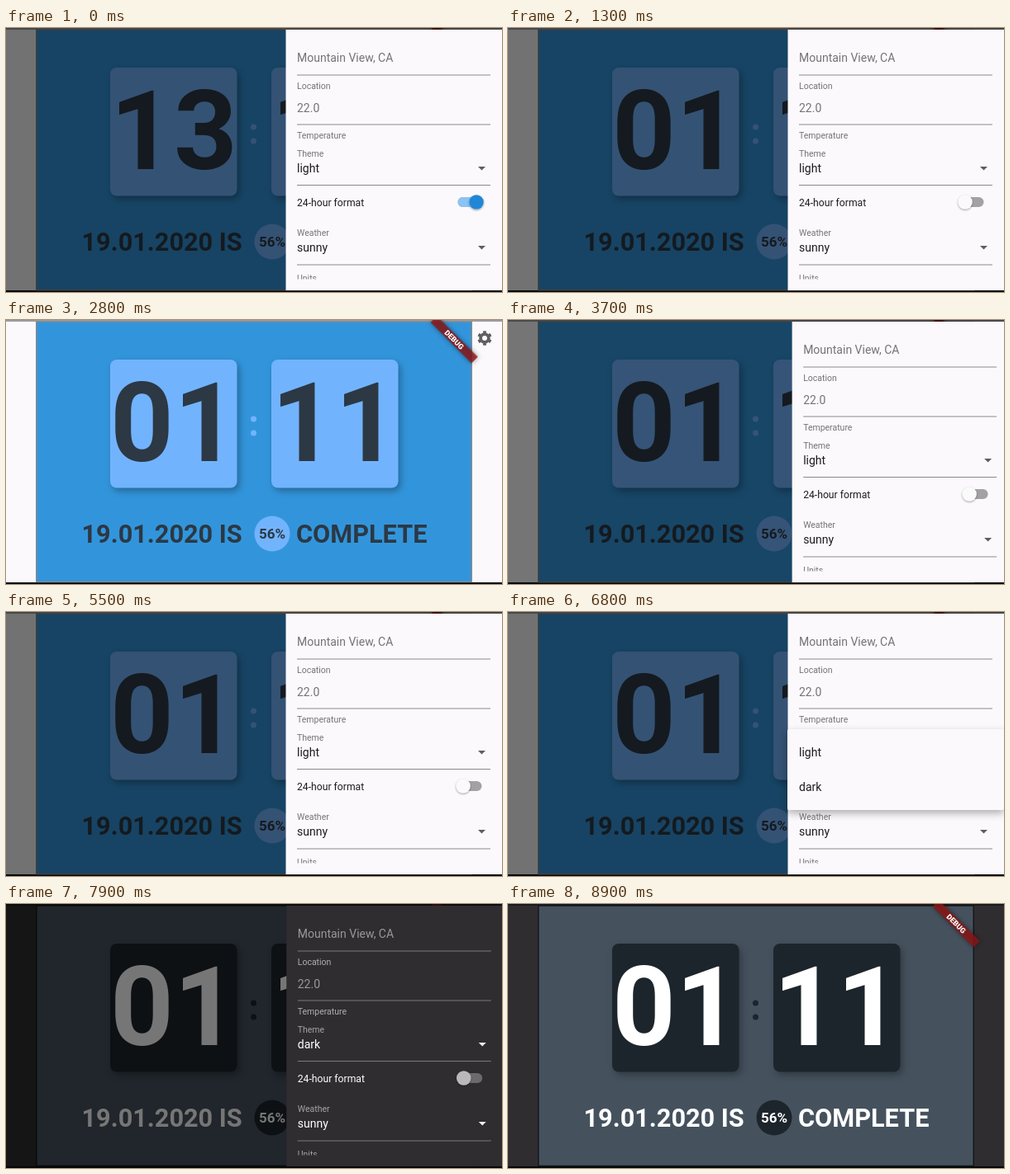
Recreate the animation shown at these times as an HTML page. Size 600x320 px, loop 9.3 s.

```html
<!DOCTYPE html>
<html lang="en">
<head>
<meta charset="utf-8">
<title>Flip clock settings</title>
<style>
html, body { margin: 0; width: 100%; height: 100%; overflow: hidden; background: #050506; }
svg { display: block; width: 600px; height: 320px; font-family: Roboto, sans-serif; }

.light {
  --page: #fbf9fc; --strip: #9d9b9d; --edge: #858b92;
  --clock: #3295db; --card: #72b3fd; --ink: #2c3844;
  --hint: #757375; --caption: #757375; --label: #757375; --value: #1e1c1e; --row: #1e1c1e;
  --rule: #8b898b; --arrow: #5f5d5f; --thumb: #fafafa; --track: #a3a1a3;
}
.turning, .dark {
  --strip: #1c1a1c; --edge: #12161b;
  --clock: #45525e; --card: #1d252c; --ink: #fff;
  --value: #fff; --arrow: #eee; --thumb: #bab8ba;
}
.turning {
  --page: #534f52; --hint: #9b999b; --caption: #a5a3a5; --label: #343234; --row: #0c0b0c;
  --rule: #2d2b2d; --track: #7d7b7d;
}
.dark {
  --page: #302d30; --hint: #9a989a; --caption: #b0aeb0; --label: #a5a3a5; --row: #fff;
  --rule: #7c7a7c; --track: #6c6a6c;
}
.turning .gear, .dark .gear { display: none; }

.page { fill: var(--page); }
.card { fill: var(--card); }
.shadow { filter: drop-shadow(3px 4px 4px rgba(0, 0, 0, .3)); }
.ink { fill: var(--ink); font-weight: 700; }
.digits { font-size: 134px; }
.line { font-size: 30.7px; }
.percent { font-size: 17px; text-anchor: middle; }
.ribbon { filter: drop-shadow(0 0 3px rgba(0, 0, 0, .5)); }
.debug { font-size: 9px; font-weight: 900; fill: #fff; text-anchor: middle; }
.hint { font-size: 14px; fill: var(--hint); }
.caption { font-size: 10.5px; fill: var(--caption); }
.label { font-size: 10.5px; fill: var(--label); }
.value { font-size: 14px; fill: var(--value); }
.row { font-size: 12.2px; fill: var(--row); }
.rule { fill: var(--rule); }
.arrow { fill: var(--arrow); }
#thumb { filter: drop-shadow(0 1px 1px rgba(0, 0, 0, .35)); }
#menuBox { filter: drop-shadow(0 4px 5px rgba(0, 0, 0, .3)); }
</style>
</head>
<body>
<svg id="stage" class="light" viewBox="0 0 600 320">
  <defs>
    <clipPath id="list"><rect x="338" y="2" width="262" height="302.5"/></clipPath>
    <path id="caret" class="arrow" d="M571 168h9l-4.500 4.500z"/>
  </defs>

  <rect class="page" width="600" height="318"/>
  <rect width="600" height="2" fill="var(--strip)"/>
  <rect x="36.750" y="2" width="526.500" height="315.500" fill="var(--clock)" stroke="var(--edge)" stroke-width="1.500"/>

  <g class="card">
    <rect class="shadow" x="126" y="48" width="153.500" height="155.500" rx="8"/>
    <rect class="shadow" x="321" y="48" width="153.500" height="155.500" rx="8"/>
    <circle cx="299.500" cy="120" r="3.500"/>
    <circle cx="299.500" cy="137" r="3.500"/>
    <circle cx="322" cy="259" r="21.500"/>
  </g>
  <g class="ink">
    <text id="hours" class="digits" x="126" y="171">13</text>
    <text class="digits" x="321" y="171">11</text>
    <text class="line" x="91.500" y="270">19.01.2020 IS</text>
    <text class="percent" x="322" y="265">56%</text>
    <text class="line" x="351" y="270">COMPLETE</text>
  </g>

  <g class="gear" transform="translate(579 22) rotate(-90)" fill="none" stroke="#615e61">
    <circle r="4.900" stroke-width="3.800"/>
    <circle r="7.400" stroke-width="2.600" pathLength="6" stroke-dasharray=".5 .5" stroke-dashoffset=".25"/>
  </g>

  <g transform="translate(542.200 23.800) rotate(45)">
    <g class="ribbon">
      <rect x="-35" y="-5.300" width="70" height="10.600" fill="#000" fill-opacity=".5"/>
      <rect x="-35" y="-5.300" width="70" height="10.600" fill="#b71c1c" fill-opacity=".63"/>
    </g>
    <text class="debug" y="3.200">DEBUG</text>
  </g>

  <rect id="scrim" width="600" height="318" fill="#000"/>

  <g id="drawer">
    <rect class="page" x="338.500" y="2" width="262" height="316"/>
    <g clip-path="url(#list)">
      <text class="hint" x="352" y="41">Mountain View, CA</text>
      <text class="caption" x="352" y="73.500">Location</text>
      <text class="hint" x="352" y="101.500">22.0</text>
      <text class="caption" x="352" y="133.500">Temperature</text>
      <text class="label" x="352" y="156">Theme</text>
      <text id="theme" class="value" x="352" y="175">light</text>
      <text class="row" x="352" y="215.500">24-hour format</text>
      <text class="label" x="352" y="251.500">Weather</text>
      <text class="value" x="352" y="271">sunny</text>
      <text class="label" x="352" y="307">Units</text>
      <g class="rule">
        <rect x="352" y="56.500" width="234" height="1"/>
        <rect x="352" y="116.500" width="234" height="1"/>
        <rect x="352" y="190" width="234" height="1"/>
        <rect x="352" y="286.500" width="234" height="1"/>
      </g>
      <use href="#caret"/>
      <use href="#caret" y="96"/>
      <rect x="546.500" y="205" width="29" height="12" rx="6" fill="var(--track)"/>
      <g id="on"><rect x="546.500" y="205" width="29" height="12" rx="6" fill="#8cc3f2"/></g>
      <g id="thumb">
        <circle cx="553" cy="211" r="8.800" fill="var(--thumb)"/>
        <circle id="thumbOn" cx="553" cy="211" r="8.800" fill="#2087d6"/>
      </g>
    </g>
  </g>

  <g id="menu">
    <rect id="menuBox" class="page" x="338" width="262" rx="2"/>
    <text class="value" x="352" y="175">light</text>
    <text id="darkItem" class="value" x="352" y="217">dark</text>
  </g>
</svg>

<script>
const LOOP = 9300, STEP = 100;
const CLOSE_1 = 1815, OPEN = 3440, CLOSE_2 = 7898;
const TOGGLE = 1050, MENU = 5705, PICK = 7100;

const $ = id => document.getElementById(id);
const ramp = (v, from, to) => Math.min(1, Math.max(0, (v - from) / (to - from)));

// Critically damped fling from 1 to 0.
function spring(ms) {
  const t = Math.max(0, ms) / 1000, w = Math.sqrt(500);
  return (1 + (w - 1) * t) * Math.exp(-w * t);
}

function openness(t) {
  if (t < OPEN) return spring(t - CLOSE_1);
  if (t < CLOSE_2) return 1 - spring(t - OPEN);
  return spring(t - CLOSE_2);
}

function drawMenu(t) {
  const p = ramp(t, MENU, MENU + 300);
  const grow = ramp(p, .25, .5);
  const top = 149 - 7 * grow, bottom = 191 + 49 * grow;
  $('menu').style.display = t >= MENU && t < PICK ? '' : 'none';
  $('menu').style.opacity = ramp(p, 0, .25);
  $('menuBox').setAttribute('y', top);
  $('menuBox').setAttribute('height', bottom - top);
  $('darkItem').style.opacity = ramp(p, .786, 1);
}

function draw(t) {
  const open = openness(t);
  const off = ramp(t, TOGGLE, TOGGLE + 200);
  const eased = off * off * (3 - 2 * off);

  $('stage').setAttribute('class', t < PICK ? 'light' : t < PICK + STEP ? 'turning' : 'dark');
  $('hours').textContent = t < TOGGLE ? '13' : '01';
  $('theme').textContent = t < PICK ? 'light' : 'dark';
  $('scrim').style.opacity = .54 * open;
  $('drawer').setAttribute('transform', `translate(${262 * (1 - open)} 0)`);
  $('thumb').setAttribute('transform', `translate(${16 * (1 - eased)} 0)`);
  $('on').style.opacity = $('thumbOn').style.opacity = 1 - eased;
  drawMenu(t);
}

// The motion advances in tenths of a second.
const start = performance.now();
function tick() {
  const t = (performance.now() - start) % LOOP;
  draw(Math.floor(t / STEP) * STEP);
  requestAnimationFrame(tick);
}
tick();
</script>
</body>
</html>
```
